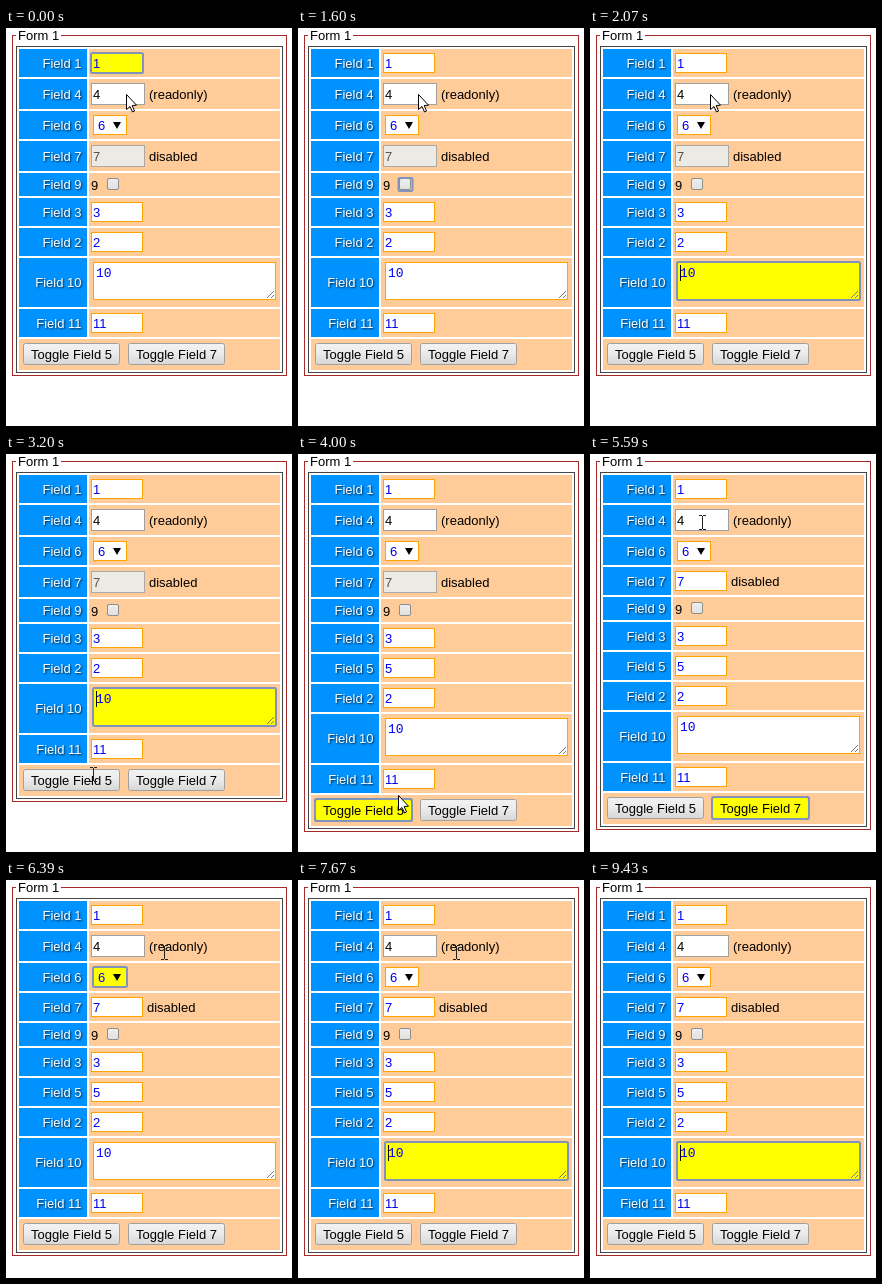
An HTML page with a canvas for the animation above (9.75 s loop, 286x398 px).

```html
<!DOCTYPE html>
<html lang="en">
<head>
<meta charset="utf-8">
<title>Form focus order</title>
<style>
  html, body { margin: 0; height: 100%; overflow: hidden; background: #fff; }
  canvas { display: block; }
</style>
</head>
<body>
<canvas id="stage" width="286" height="398"></canvas>
<script>
const ctx = document.getElementById('stage').getContext('2d');
const LOOP = 9750, STEP = 160;
const SANS = '13px "Liberation Sans", Arial, sans-serif';
const MONO = '13px "Liberation Mono", monospace';
const ORANGE = '#ffa500', YELLOW = '#ff0', BLUE = '#0000f0', RING = '#8093b8';

// [start, focused control]
const focusAt = [[0, 1], [470, 4], [1120, 6], [1600, 9], [2070, 10], [3680, 'b5'], [4790, 'b7'],
  [5750, 4], [5910, 5], [6390, 6], [6710, 7], [7190, 9], [7670, 10]];
// [start, steps, x, y]
const moves = [[2550, 5, 87, 320], [3360, 1, 87, 335], [3830, 6, 137, 360],
  [4950, 5, 112, 68], [5910, 1, 158, 72], [8470, 5, 158, 29]];

const within = (t, a, b) => t >= a && t < b;

function rect(x, y, w, h, color) {
  ctx.fillStyle = color;
  ctx.fillRect(x, y, w, h);
}

function frame(x, y, w, h, color) {
  ctx.strokeStyle = color;
  ctx.lineWidth = 1;
  ctx.strokeRect(x + .5, y + .5, w - 1, h - 1);
}

function text(str, x, y, color = '#000', align = 'left', font = SANS) {
  ctx.font = font;
  ctx.textAlign = align;
  ctx.fillStyle = color;
  ctx.fillText(str, x, y);
}

function path(points) {
  ctx.beginPath();
  points.forEach(p => ctx.lineTo(...p));
  ctx.closePath();
}

function ring(x, y, w, h) {
  ctx.strokeStyle = RING;
  ctx.lineWidth = 2;
  ctx.beginPath();
  ctx.roundRect(x, y, w, h, 1.5);
  ctx.stroke();
}

function box(x, y, w, h, focused, border = ORANGE, fill = '#fff') {
  rect(x, y, w, h, focused ? YELLOW : fill);
  frame(x, y, w, h, border);
  if (focused) ring(x, y, w, h);
}

function input(y, value, focused) {
  box(85, y + 4, 52, 20, focused);
  text(value, 87, y + 19, BLUE);
}

function readonlyInput(y, focused) {
  rect(85, y + 4, 54, 22, focused ? YELLOW : '#fff');
  frame(85, y + 4, 54, 22, '#a0a0a0');
  text('4', 87, y + 20);
  text('(readonly)', 143, y + 20);
}

function select(y, focused) {
  box(87, y + 4, 34, 20, focused);
  text('6', 92, y + 19, BLUE);
  ctx.fillStyle = '#000';
  path([[107, y + 11], [115, y + 11], [111, y + 18]]);
  ctx.fill();
}

function toggledInput(y, enabled, focused) {
  if (enabled) input(y, '7', focused);
  else {
    box(85, y + 4, 54, 22, false, '#a9a9a9', '#ebebe4');
    text('7', 87, y + 20, '#545454');
  }
  text('disabled', enabled ? 141 : 143, y + (enabled ? 19 : 20));
}

function checkbox(y, focused) {
  text('9', 85, y + 17);
  const g = ctx.createLinearGradient(0, y + 5, 0, y + 18);
  g.addColorStop(0, '#f0f0f0');
  g.addColorStop(1, '#dedede');
  ctx.fillStyle = g;
  ctx.strokeStyle = '#8e8e8e';
  ctx.lineWidth = 1;
  ctx.beginPath();
  ctx.roundRect(101.5, y + 5.5, 11, 11, 1.5);
  ctx.fill();
  ctx.stroke();
  if (focused) ring(100.5, y + 5, 14, 13);
}

function textarea(y, focused, caret) {
  box(87, y + 4, 183, 38, focused);
  text('10', 90, y + 19, BLUE, 'left', MONO);
  if (caret) rect(90, y + 7, 1, 16, '#000');
  ctx.strokeStyle = '#777';
  ctx.lineWidth = 1;
  ctx.beginPath();
  for (const d of [7, 3]) {
    ctx.moveTo(268 - d, y + 40);
    ctx.lineTo(268, y + 40 - d);
  }
  ctx.stroke();
}

function button(label, x, y, focused, hover) {
  const g = ctx.createLinearGradient(0, y, 0, y + 22);
  g.addColorStop(0, '#f3f3f3');
  g.addColorStop(.45, '#ebebeb');
  g.addColorStop(1, '#d6d6d6');
  ctx.save();
  ctx.fillStyle = focused ? YELLOW : g;
  ctx.strokeStyle = hover ? '#808080' : '#a0a0a0';
  ctx.lineWidth = 1;
  ctx.beginPath();
  ctx.roundRect(x + .5, y + .5, 96, 21, 2);
  if (hover) { ctx.shadowColor = 'rgba(0,0,0,.2)'; ctx.shadowBlur = 2; ctx.shadowOffsetY = 1; }
  ctx.fill();
  ctx.restore();
  ctx.strokeStyle = hover ? '#808080' : '#a0a0a0';
  ctx.lineWidth = 1;
  ctx.stroke();
  if (focused) ring(x, y, 97, 22);
  text(label, x + 48.5, y + 16, '#000', 'center');
}

function pointer(t) {
  if (t >= 9270) return;
  let x = 120, y = 66;
  for (const [start, steps, toX, toY] of moves) {
    if (t < start) break;
    const k = Math.min(1, (Math.floor((t - start) / STEP) + 1) / steps);
    const e = k * k * (3 - 2 * k);
    x += (toX - x) * e;
    y += (toY - y) * e;
  }
  ctx.save();
  ctx.translate(Math.round(x), Math.round(y));
  if (within(t, 3040, 3360) || within(t, 5590, 8470)) {
    rect(0, -6, 1, 13, '#222');
    for (const end of [-7, 7]) {
      rect(-3, end, 3, 1, '#222');
      rect(1, end, 3, 1, '#222');
    }
  } else {
    path([[.5, .5], [.5, 15.5], [4, 12.5], [6.5, 18], [8.5, 17], [6.2, 11.5], [10.5, 11.2]]);
    ctx.fillStyle = '#fff';
    ctx.fill();
    ctx.strokeStyle = '#000';
    ctx.lineWidth = 1;
    ctx.stroke();
  }
  ctx.restore();
}

function draw(t) {
  const focus = focusAt.findLast(f => t >= f[0])[1];
  const enabled = t >= 4790;
  const caret = focus === 10 && !(within(t, 2550, 3030) || within(t, 8150, 8630) || within(t, 9110, 9430));
  const plain = (id, value = String(id)) => [id, 28, y => input(y, value, focus === id)];
  // [field number, row height, content]
  const rows = [
    plain(1),
    [4, 30, y => readonlyInput(y, focus === 4)],
    [6, 28, y => select(y, focus === 6)],
    [7, enabled ? 28 : 30, y => toggledInput(y, enabled, focus === 7)],
    [9, 23, y => checkbox(y, focus === 9)],
    plain(3),
    ...(t >= 3680 ? [plain(5)] : []),
    plain(2),
    [10, 49, y => textarea(y, focus === 10, caret)],
    plain(11)
  ];

  rect(0, 0, 286, 398, '#fff');
  let y = 21;
  for (const [id, h, content] of rows) {
    rect(13, y, 68, h, '#0092ff');
    rect(83, y, 191, h, '#ffcc99');
    ctx.save();
    ctx.shadowColor = 'rgba(0,0,0,.75)';
    ctx.shadowBlur = 2;
    ctx.shadowOffsetX = ctx.shadowOffsetY = 1;
    text('Field ' + id, 75.5, y + Math.floor(h / 2) + 5, '#fff', 'right');
    ctx.restore();
    content(y);
    y += h + 2;
  }
  rect(13, y, 261, 31, '#ffcc99');
  button('Toggle Field 5', 17, y + 4, focus === 'b5', within(t, 3360, 3680));
  button('Toggle Field 7', 122, y + 4, focus === 'b7', within(t, 4470, 4950));

  frame(10, 18, 267, y + 16, '#444');
  frame(6, 7, 275, y + 30, '#a52a2a');
  rect(10, 2, 45, 12, '#fff');
  text('Form 1', 12, 12);
  pointer(t);
}

const began = performance.now();
function tick() {
  draw((performance.now() - began) % LOOP);
  requestAnimationFrame(tick);
}
tick();
</script>
</body>
</html>
```
